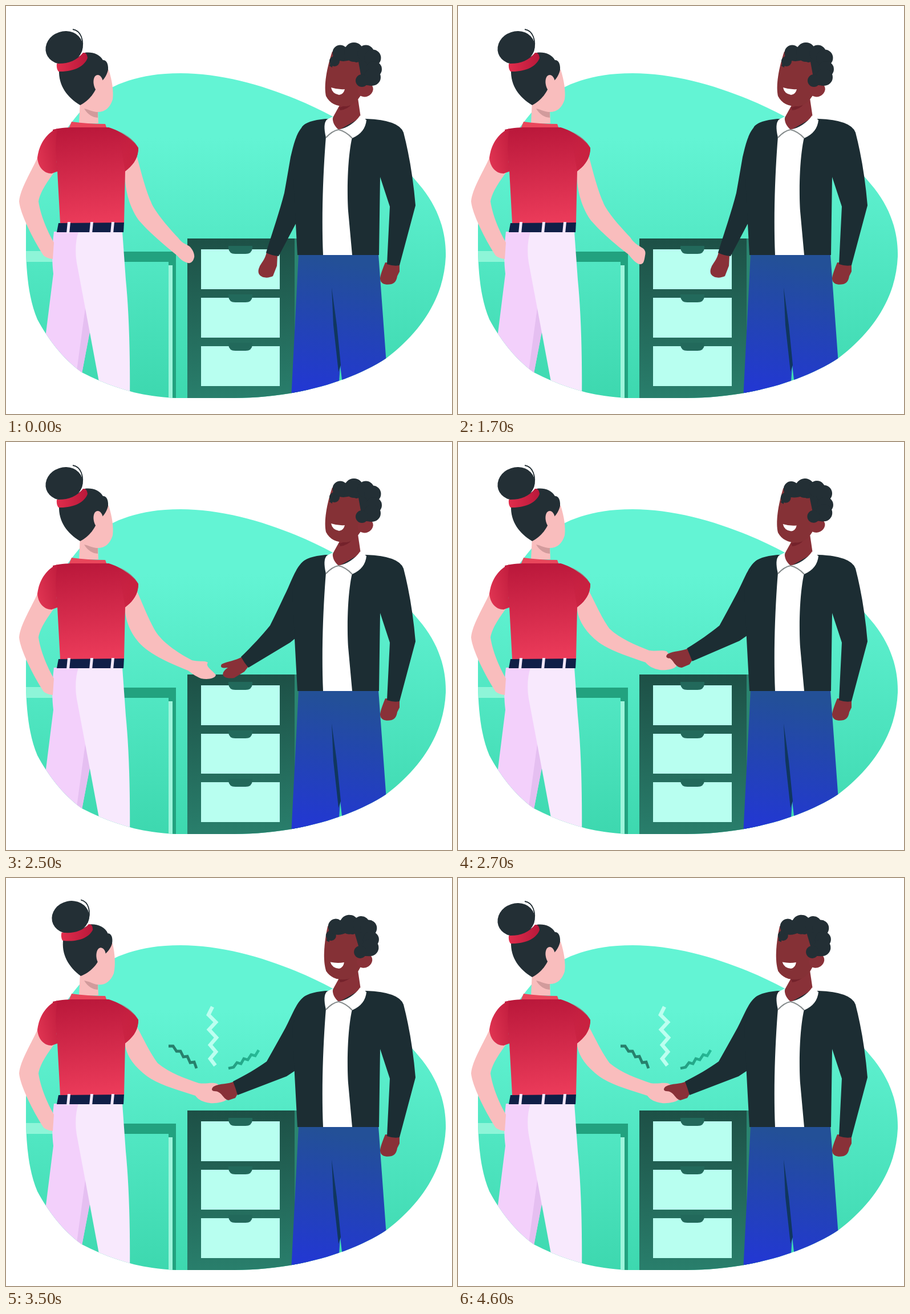
An HTML page for the animation above (4700 ms loop, 782 by 716 pixels).

```html
<!DOCTYPE html>
<html lang="en">
<head>
<meta charset="utf-8">
<title>Handshake</title>
<style>
html, body { margin: 0; width: 100%; height: 100%; overflow: hidden; background: #fff; }
svg { display: block; width: 782px; height: 716px; }
.skin { fill: #f9bdbd; }
.dark { fill: #1c2d33; }
.hair { fill: #232f35; }
.brown { fill: #893138; }
.zig { fill: none; stroke-width: 4.8; stroke-dasharray: 1 2; }
</style>
</head>
<body>
<svg viewBox="0 0 782 716">
  <defs>
    <path id="blob" d="M306 118C400 118 500 155 573 194C640 228 690 270 730 320C760 358 772 400 771 440C768 510 730 570 667 618C600 662 500 688 400 688L300 688C240 686 190 672 133 643C100 620 72 582 55 550C40 515 36 470 35 430L35 385C45 330 60 270 128 188C165 145 220 118 306 118Z"/>
    <clipPath id="clip"><use href="#blob"/></clipPath>
    <linearGradient id="mint" x2="0" y2="1"><stop offset=".2" stop-color="#63f4d4"/><stop offset="1" stop-color="#3dd8af"/></linearGradient>
    <linearGradient id="cabinet" x2="0" y2="1"><stop stop-color="#1d5046"/><stop offset="1" stop-color="#297f6c"/></linearGradient>
    <linearGradient id="red" x2=".08" y2="1"><stop stop-color="#b9173a"/><stop offset="1" stop-color="#ea3a59"/></linearGradient>
    <linearGradient id="sleeveL" x1="1" x2="0" y2=".6"><stop stop-color="#c01c3d"/><stop offset="1" stop-color="#de3351"/></linearGradient>
    <linearGradient id="sleeveR" x2="1" y2=".6"><stop stop-color="#c52040" stop-opacity="0"/><stop offset="1" stop-color="#c9213f"/></linearGradient>
    <linearGradient id="band" x2="1"><stop stop-color="#e02d4c"/><stop offset="1" stop-color="#b9183a"/></linearGradient>
    <linearGradient id="jeans" x2="-.1" y2="1"><stop stop-color="#235097"/><stop offset="1" stop-color="#2235d8"/></linearGradient>
    <linearGradient id="spark" x2="1"><stop stop-color="#249a7f"/><stop offset="1" stop-color="#25bb97"/></linearGradient>
  </defs>

  <use href="#blob" fill="url(#mint)"/>
  <g clip-path="url(#clip)">
    <path fill="#8ef5d8" d="M30 430H90V449H30Z"/>
    <path fill="#22a27f" d="M200 431H298V690H292V455H285V449H200Z"/>
    <path fill="#9df5dc" d="M285 455H292V690H285Z"/>
    <path fill="#2a8570" d="M503 408H530V690H500Z"/>
    <path fill="url(#cabinet)" d="M318 408H506V690H318Z"/>
    <g id="drawers"></g>
    <path fill="#f3d0fb" d="M84 396C81 420 80 445 83 470L68 590L120 670L132 650L147 570L165 396Z"/>
    <path fill="#e5bff1" d="M141 515L147 572L132 650L124 640Z"/>
    <path fill="#f8e9fd" d="M127 396C121 415 121 436 125 456L146 568L165 670L217 695C218 620 216 540 210 480L204 396Z"/>
    <path fill="url(#jeans)" d="M513 435H653L667 628L590 664L586 630L582 690H500Z"/>
    <path fill="#10365f" d="M571 494L574 560L583 642L587 630L580 560Z"/>
  </g>

  <path id="zigL" class="zig" pathLength="1" stroke="#27806c" d="M334 334L330 323L323 324L318 313L311 314L306 304L299 304L293 295L285 295"/>
  <path id="zigM" class="zig" pathLength="1" stroke="#bcfff0" style="stroke-width:6.5" d="M367 329L358 317L368 305L358 293L369 280L356 266L368 253L355 240L362 226"/>
  <path id="zigR" class="zig" pathLength="1" stroke="url(#spark)" d="M390 334L399 332L405 324L412 326L417 317L424 319L430 310L437 312L443 302"/>

  <!-- woman -->
  <path class="skin" d="M56 264C45 290 25 320 23 343C25 365 48 410 64 435C66 440 74 443 82 444L84 415C72 395 60 365 57 343C60 325 75 305 85 291Z"/>
  <path id="armW" class="skin"/>
  <path class="skin" d="M130 165L128 206H162L161 180Z"/>
  <path fill="#d29b9c" d="M137 180L161 186V196Q146 195 137 180Z"/>
  <path fill="#e9465b" d="M115 203Q143 207 174 207L177 215H110Z"/>
  <path fill="url(#red)" d="M82 217C97 213 112 213 125 213H180C201 219 222 234 232 249C232 268 222 280 209 290L207 381H95L90 289Z"/>
  <path fill="url(#sleeveL)" d="M90 215C72 222 58 242 55 266C56 282 66 294 80 294L91 290Q84 250 90 215Z"/>
  <path fill="url(#sleeveR)" d="M196 218C214 226 227 239 232 249C232 268 222 280 209 290Z"/>
  <path fill="#101f47" d="M92 381L207 380L206 397L89 397Z"/>
  <path fill="#f4e8fb" d="M108 379h5l-2 20h-5ZM148 379h5l-2 20h-5ZM185 379h5l-2 20h-5Z"/>
  <g id="headW">
    <path class="skin" d="M150 100L180 112C186 130 189 150 187 164C182 180 172 187 158 186C145 184 135 178 130 170Z"/>
    <path class="hair" d="M93 112C92 140 107 160 130 174C146 166 158 150 160 137C170 133 177 122 179 112C180 99 174 94 170 95C164 84 150 80 138 82Z"/>
    <path class="skin" d="M158 148C151 138 152 121 161 121C169 122 171 133 172 147Z"/>
    <ellipse class="hair" cx="102" cy="73" rx="33" ry="28.5" transform="rotate(-18 102 73)"/>
    <path fill="none" stroke="#232f35" stroke-width="1.8" d="M117 41C131 43 138 60 132 80"/>
    <path fill="url(#band)" d="M89 101C108 102 124 96 135 82Q142 81 143 91C138 106 118 116 92 115Q88 110 89 101Z"/>
  </g>

  <!-- man -->
  <path class="brown" d="M665 450C661 460 656 472 656 479C657 489 668 490 676 488C683 486 685 480 686 474L690 466V452Z"/>
  <path id="handM" class="brown"/>
  <path id="armM" class="dark"/>
  <path class="dark" d="M560 198Q527 201 519 212L502 260L506 345L511 437H654L656 300L673 352L668 453Q680 457 690 455L718 350Q712 280 697 222Q689 200 632 198Z"/>
  <path fill="#fff" d="M561 229L583 215L607 230C598 270 598 330 600 360L607 437H556C553 370 556 290 561 229Z"/>
  <path class="brown" d="M590 165L574 194C570 203 574 213 583 218L622 196L616 155Z"/>
  <path fill="#74222b" d="M584 178L606 172Q600 181 586 183Z"/>
  <path fill="#fff" d="M573 194L563 199Q555 206 561 231L583 217L607 232Q630 222 632 200L621 192C612 205 598 214 583 217C575 210 572 202 573 194Z"/>
  <path fill="none" stroke="#858b8c" stroke-width="2" d="M561 231Q572 219 583 217Q596 220 607 232"/>
  <g id="headM">
    <path fill="#853136" d="M572 80C562 110 557 140 561 158C568 172 582 177 597 176C610 174 618 164 623 155L630 85Z"/>
    <ellipse class="brown" cx="630" cy="147" rx="14" ry="12" transform="rotate(-25 630 147)"/>
    <g class="hair">
      <path d="M567 105L577 78L610 67L640 76L654 100L652 130L640 140L625 138L622 120L618 98Q612 101 606 94Q590 100 579 94Q572 100 572 108Z"/>
      <circle cx="576" cy="97" r="9"/><circle cx="586" cy="82" r="13.5"/><circle cx="610" cy="81" r="17"/>
      <circle cx="631" cy="83" r="14.5"/><circle cx="643" cy="91" r="14.5"/><circle cx="645" cy="111" r="14"/>
      <circle cx="642" cy="125" r="15"/><circle cx="624" cy="131" r="11"/>
    </g>
    <path fill="#fff" d="M570 143Q582 147 594 146Q592 155 584 156Q572 154 570 143Z"/>
  </g>
</svg>
<script>
const $ = id => document.getElementById(id);
const LOOP = 4700, STEP = 100;

$('drawers').innerHTML = [427, 512, 597].map(y =>
  `<path fill="#b8fff0" d="M342 ${y}H480v70H342Z"/>
   <path fill="#22695b" d="M390 ${y - 6}H432V${y - 2}Q431 ${y + 8} 420 ${y + 8}H402Q391 ${y + 8} 390 ${y - 2}Z"/>`).join('');

// Arm poses: hanging, starting, reaching, open hands, clasped
const poseTimes = [1500, 1700, 2300, 2500, 2900];
const armDown = 'M530 205C510 212 504 245 499 265Q493 300 488 328C480 360 466 400 456 433Q466 438 478 439L507 384L540 330Z';
const handDown = 'M457 431C455 445 446 452 444 459C442 463 442 468 444 471C450 479 462 477 468 474L475 456L476 437Z';
const poses = {
  armW: [
    'M228 258C238 296 246 328 258 352C270 372 288 392 302 407C308 416 316 418 322 422C328 428 331 436 330 441C328 450 322 453 316 450C308 447 304 442 299 437C275 418 246 392 232 375C215 350 208 320 208 288Z',
    'M228 258C238 296 246 328 258 352C270 372 288 391 302 406C308 416 316 420 324 425C329 429 329 433 328 438C326 450 325 454 317 453C309 449 304 442 299 436C275 418 246 392 232 375C215 350 208 320 208 288Z',
    'M228 258C241 294 249 322 261 343C275 366 298 383 316 397C322 398 332 396 337 399C344 404 350 416 351 429C348 431 344 432 338 431C325 428 315 422 307 414C275 398 250 383 232 362C215 340 208 315 208 288Z',
    'M228 258C242 290 252 316 264 335C278 355 305 372 326 383C336 386 348 383 354 387C348 394 364 402 368 409C366 416 352 417 342 415C332 411 326 406 319 401C285 387 255 374 236 355C217 335 209 312 208 288Z',
    'M228 258C243 286 253 308 266 325C286 342 315 352 338 360C350 362 360 358 370 361C378 366 386 380 388 388C384 393 368 396 358 395C345 393 338 390 332 382C300 371 262 362 240 342C220 325 210 308 208 288Z'],
  armM: [
    armDown,
    armDown,
    'M530 205C510 210 503 243 493 268Q481 300 470 330C460 348 443 378 429 399Q437 409 447 412L507 360L540 320Z',
    'M530 205C510 210 502 243 487 272Q474 300 463 322C450 338 430 360 412 377Q418 388 425 396L498 352L540 318Z',
    'M530 205C510 210 502 243 485 272Q470 299 457 322C440 334 420 346 398 357Q403 370 406 381L492 348L540 316Z'],
  handM: [
    handDown,
    handDown,
    'M430 398C424 408 410 414 405 419C403 423 402 430 404 436C412 443 424 442 430 437L439 424L446 410Z',
    'M414 377C402 384 388 385 378 390C374 397 382 397 389 396C374 406 379 417 400 414L418 403L425 394Z',
    'M400 357C390 362 375 360 364 366C359 370 361 374 365 374C379 374 380 388 390 390L402 386L406 379Z']
};

const clamp = x => Math.min(1, Math.max(0, x));
const smooth = x => x * x * (3 - 2 * x);
const ramp = (t, a, b) => smooth(clamp((t - a) / (b - a)));

function mix(a, b, k) {
  const to = b.match(/\d+/g);
  let i = 0;
  return a.replace(/\d+/g, n => (+n + (to[i++] - n) * k).toFixed(2) + ' ');
}

function draw(t) {
  let i = 0;
  while (i < 3 && t >= poseTimes[i + 1]) i++;
  let k = clamp((t - poseTimes[i]) / (poseTimes[i + 1] - poseTimes[i]));
  if (i === 1) k = k * k;
  if (i === 3) k = k * (2 - k);
  for (const id in poses) $(id).setAttribute('d', mix(poses[id][i], poses[id][i + 1], k));

  const tiltM = -12 * ramp(t, 2600, 3100) + 6 * ramp(t, 3100, 3500);
  const tiltW = 5.6 * (ramp(t, 3100, 3500) - ramp(t, 3700, 4200));
  $('headM').setAttribute('transform', `rotate(${tiltM} 612 158)`);
  $('headW').setAttribute('transform', `rotate(${tiltW} 150 185)`);

  const shown = ramp(t, 2750, 3050);
  for (const id of ['zigL', 'zigM', 'zigR']) {
    $(id).style.strokeDashoffset = 1 - shown;
    $(id).style.visibility = shown ? 'visible' : 'hidden';
  }
}

const start = performance.now();
function tick() {
  const t = (performance.now() - start) % LOOP;
  draw(Math.floor(t / STEP) * STEP);
  requestAnimationFrame(tick);
}
tick();
</script>
</body>
</html>
```
